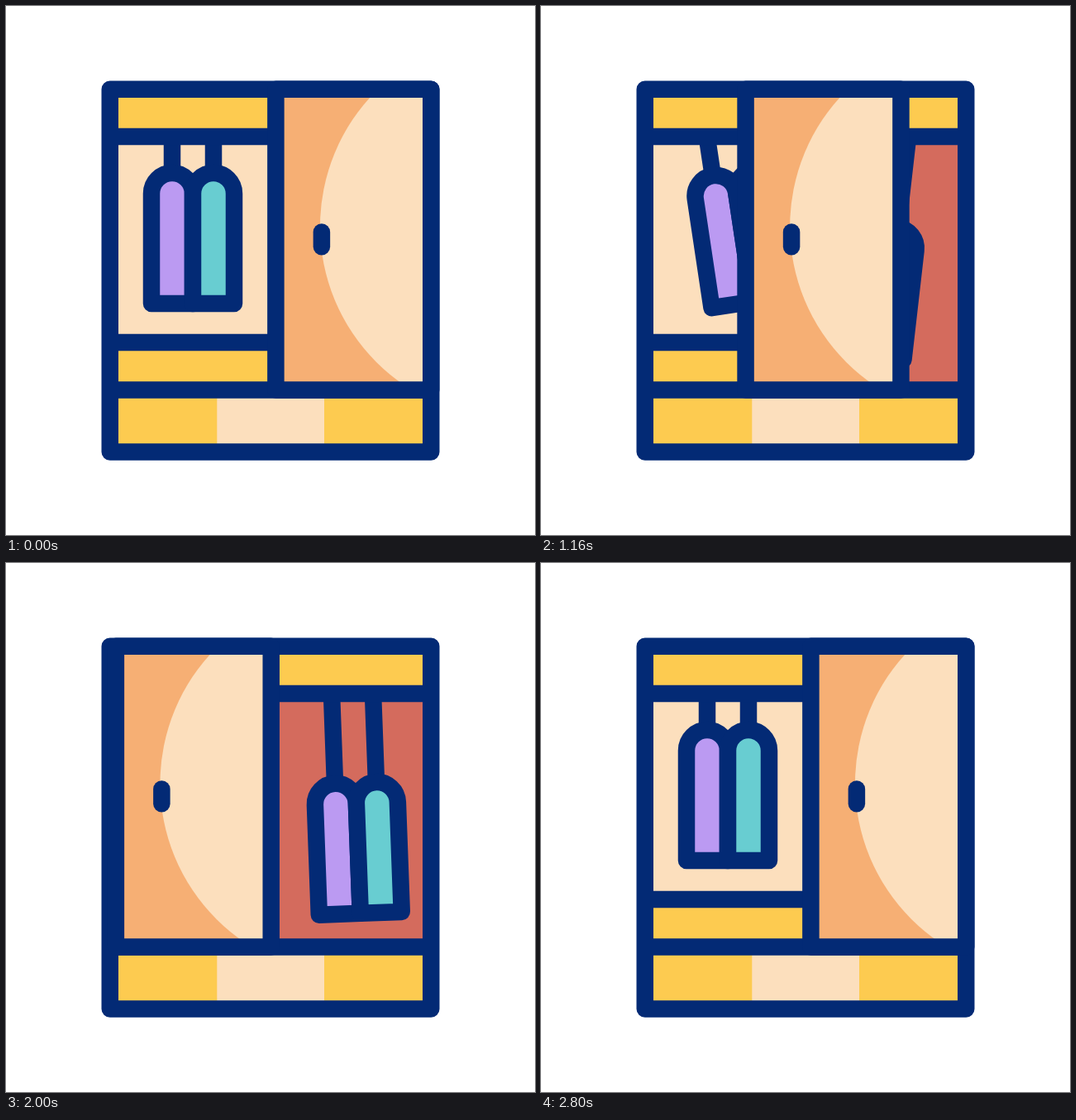
An HTML page that plays this animation: 640 by 640 pixels, repeating every 3 s.

```html
<!DOCTYPE html>
<html lang="en">
<head>
<meta charset="utf-8">
<title>Wardrobe</title>
<style>
  html, body { margin: 0; height: 100%; overflow: hidden; background: #fff; }
  svg { display: block; width: 100vw; height: 100vh; }
  .line { fill: none; stroke: #032a75; stroke-width: 20.5; stroke-linejoin: round; }
  .yellow { fill: #fdcb50; }
  .cream { fill: #fcdfbd; }
  .orange { fill: #f6af74; }
  .red { fill: #d46b5d; }
  .purple { fill: #bb9af2; }
  .teal { fill: #68cdd1; }
</style>
</head>
<body>
<svg viewBox="0 0 640 640">
  <defs>
    <clipPath id="panel"><path d="M326 101H514V464H326z"/></clipPath>
    <!-- Two garments around x = 0, with the shoulders at y = 0 -->
    <g id="clothes">
      <path class="line purple" style="fill:#bb9af2" d="M-50 133V0a25 25 0 0 1 50 0V133z"/>
      <path class="line teal" style="fill:#68cdd1" d="M0 133V0a25 25 0 0 1 50 0V133z"/>
    </g>
  </defs>

  <path class="yellow" d="M126 101H514V540H126z"/>
  <path class="cream" d="M126 158H320V407H126zM255.3 464H385V540H255.3z"/>
  <path class="red" d="M320 158H514V464H320z"/>

  <g id="left">
    <path class="line" d="M201 158V202M251 158V202"/>
    <use href="#clothes" x="226" y="227"/>
  </g>
  <g id="right">
    <path class="line" d="M394 158V266M444 158V266"/>
    <use href="#clothes" x="419" y="291"/>
  </g>

  <path class="line" d="M126 158H514M126 407H320M126 464.4H514"/>
  <path class="line" d="M125.75 100.75H514.25V539.5H125.75z"/>

  <g id="door">
    <g clip-path="url(#panel)">
      <path class="orange" d="M326 101H514V464H326z"/>
      <circle class="cream" cx="612" cy="266.7" r="232"/>
    </g>
    <path class="line" d="M326.4 100.75H514.25V464.4H326.4z"/>
    <path class="line" stroke-linecap="round" d="M381.9 273.5V291.2"/>
  </g>
</svg>
<script>
  const LOOP = 3000;
  // Each track is a list of [time in ms, value]
  const doorX = [[910, 0], [1497, -201], [1929, -201], [2550, 0]];
  const leftSwing = [[261, 0], [682, 9], [1103, -9], [1524, 0],
                     [1793, 0], [2120, 7], [2455, -6.9], [2800, 0]];
  const rightSwing = [[850, 0], [1240, 7.3], [1690, -7.4], [2170, 0]];

  const [door, left, right] = ['door', 'left', 'right'].map(id => document.getElementById(id));

  function valueAt(track, t) {
    const next = track.findIndex(([time]) => time > t);
    if (next < 1) return 0;
    const [t0, a] = track[next - 1], [t1, b] = track[next];
    const u = (t - t0) / (t1 - t0);
    return a + (b - a) * u * u * (3 - 2 * u);
  }

  function draw() {
    const t = performance.now() % LOOP;
    door.setAttribute('transform', `translate(${valueAt(doorX, t)})`);
    left.setAttribute('transform', `rotate(${valueAt(leftSwing, t)} 226 158)`);
    right.setAttribute('transform', `rotate(${valueAt(rightSwing, t)} 419 158)`);
    requestAnimationFrame(draw);
  }
  draw();
</script>
</body>
</html>
```
